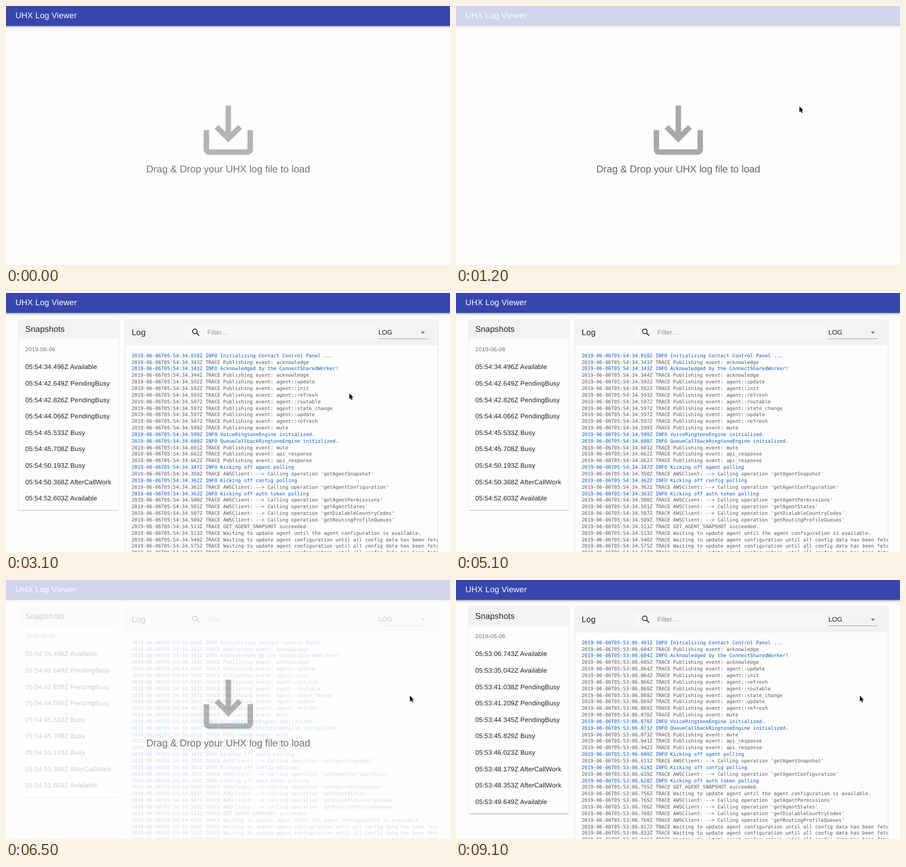
An HTML page with a canvas that plays this animation: 800x467 px, repeating every 10000 ms.

```html
<!DOCTYPE html>
<html lang="en">
<head>
<meta charset="utf-8">
<title>Log Viewer</title>
<style>
  html, body { margin: 0; width: 100%; height: 100%; overflow: hidden; background: #fefdfe; }
  canvas { display: block; width: 800px; height: 467px; }
</style>
</head>
<body>
<canvas id="stage" width="800" height="467"></canvas>
<script>
const W = 800, H = 467, LOOP = 10000, STEP = 100;
const REM = 16 * 800 / 1080;
const SANS = '"Liberation Sans", Arial, sans-serif';
const MONO = '"DejaVu Sans Mono", monospace';
const PAPER = '#fefdfe', BAR = '#3546ac', CARD_HEAD = '#f3f2f4';
const INK = 'rgba(0,0,0,.87)', SOFT = 'rgba(0,0,0,.54)', FAINT = 'rgba(0,0,0,.42)';

const ctx = document.getElementById('stage').getContext('2d');
ctx.textRendering = 'geometricPrecision';

const event = name => 'TRACE Publishing event: ' + name;
const call = name => `TRACE AWSClient: --> Calling operation '${name}'`;
const info = text => 'INFO ' + text;

const start = [
  info('Initializing Contact Control Panel ...'),
  event('acknowledge'),
  info('Acknowledged by the ConnectSharedWorker!'),
  ...['acknowledge', 'agent::update', 'agent::init', 'agent::refresh', 'agent::routable',
    'agent::state_change', 'agent::update', 'agent::refresh', 'mute'].map(event),
  info('VoiceRingtoneEngine initialized.'),
  info('QueueCallbackRingtoneEngine initialized.'),
  ...['mute', 'api_response', 'api_response'].map(event),
  info('Kicking off agent polling'),
  call('getAgentSnapshot'),
  info('Kicking off config polling'),
  call('getAgentConfiguration'),
  info('Kicking off auth token polling')
];
const calls = ['getAgentPermissions', 'getAgentStates', 'getDialableCountryCodes',
  'getRoutingProfileQueues'].map(call);
const snapshot = [
  'TRACE GET_AGENT_SNAPSHOT succeeded.',
  'TRACE Waiting to update agent until the agent configuration is available.'
];
const waiting = Array(3).fill(
  'TRACE Waiting to update agent configuration until all config data has been fetched.');

function makeLog(prefix, millis, messages, states) {
  return {
    states,
    lines: millis.split(' ').map((ms, i) => ({
      text: `2019-06-06T${prefix}.${ms}Z ${messages[i]}`,
      color: messages[i].startsWith('INFO') ? '#0b5cca' : '#575659'
    }))
  };
}

const firstLog = makeLog('05:54:34',
  '018 343 343 344 592 592 593 597 597 597 597 599 599 600 601 662 662 347 350 362 362 363 ' +
  '500 501 507 509 513 513 540 575 577',
  [...start, ...calls, ...snapshot, ...waiting],
  ['05:54:34.496Z Available', '05:54:42.649Z PendingBusy', '05:54:42.826Z PendingBusy',
    '05:54:44.066Z PendingBusy', '05:54:45.533Z Busy', '05:54:45.708Z Busy',
    '05:54:50.193Z Busy', '05:54:50.368Z AfterCallWork', '05:54:52.603Z Available']);

const secondLog = makeLog('05:53:06',
  '401 604 604 605 864 864 866 869 869 869 869 870 870 871 873 941 942 609 611 619 619 620 ' +
  '755 756 765 766 768 769 817 833 846',
  [...start, ...snapshot, ...calls, ...waiting],
  ['05:53:06.743Z Available', '05:53:35.042Z Available', '05:53:41.038Z PendingBusy',
    '05:53:41.209Z PendingBusy', '05:53:44.345Z PendingBusy', '05:53:45.829Z Busy',
    '05:53:46.023Z Busy', '05:53:48.179Z AfterCallWork', '05:53:48.353Z AfterCallWork',
    '05:53:49.649Z Available']);

function text(str, x, y, size, color, { spacing = 0, align = 'left', family = SANS, weight = 400 } = {}) {
  ctx.font = `${weight} ${size}px ${family}`;
  ctx.letterSpacing = spacing * size + 'px';
  ctx.textAlign = align;
  ctx.fillStyle = color;
  ctx.fillText(str, x, y);
}

function box(x, y, w, h, color, radius = 0) {
  ctx.fillStyle = color;
  ctx.beginPath();
  ctx.roundRect(x, y, w, h, radius);
  ctx.fill();
}

function shadowed(dy, blur, alpha, draw) {
  ctx.save();
  ctx.shadowColor = `rgba(0,0,0,${alpha})`;
  ctx.shadowOffsetY = dy;
  ctx.shadowBlur = blur;
  draw();
  ctx.restore();
}

function polygon(points, color) {
  ctx.beginPath();
  points.forEach(([x, y]) => ctx.lineTo(x, y));
  ctx.closePath();
  ctx.fillStyle = color;
  ctx.fill();
}

function line(x1, y1, x2, y2, color, width) {
  ctx.strokeStyle = color;
  ctx.lineWidth = width;
  ctx.beginPath();
  ctx.moveTo(x1, y1);
  ctx.lineTo(x2, y2);
  ctx.stroke();
}

function drawBar() {
  const bar = () => box(-10, -10, W + 20, 45.6, BAR);
  shadowed(1.5, 3, .3, bar);
  shadowed(2, 5, .2, bar);
  text('UHX Log Viewer', 17, 22.3, 1.25 * REM, '#fff', { spacing: .0075 });
}

function drawCard(x, w, bottom, headHeight, title, titleX, titleY) {
  const top = 47.4;
  const card = () => box(x, top, w, bottom - top, PAPER, 3);
  shadowed(.8, 2.2, .2, card);
  shadowed(.8, .8, .2, card);
  box(x, top, w, headHeight, CARD_HEAD, [3, 3, 0, 0]);
  text(title, titleX, titleY, 1.25 * REM, INK, { spacing: .0075 });
}

function drawSnapshots(states) {
  const pitch = 29.65;
  drawCard(23, 180, 124.6 + pitch * states.length, 35.6, 'Snapshots', 34.8, 70);
  text('2019-06-06', 34.8, 104.6, .875 * REM, SOFT, { spacing: .01071 });
  states.forEach((s, i) => text(s, 34.8, 137.2 + i * pitch, REM, INK, { spacing: .00938 }));
}

function drawSearch() {
  box(322, 58, 344, 26, '#f7f6f8', 3);
  ctx.strokeStyle = INK;
  ctx.lineWidth = 1.5;
  ctx.beginPath();
  ctx.arc(340.2, 69.2, 4.1, 0, 7);
  ctx.stroke();
  line(343.4, 72.4, 348, 77, INK, 1.7);
  text('Filter…', 362.8, 75, REM, FAINT);
}

function drawSelect() {
  text('LOG', 671, 74.6, REM, INK);
  box(671, 82, 89, .8, FAINT);
  polygon([[747.3, 69.8], [754.9, 69.8], [751.1, 73.6]], SOFT);
}

function drawLog({ states, lines }) {
  drawSnapshots(states);
  drawCard(214.8, 563.4, H + 20, 47.4, 'Log', 226.5, 76.2);
  drawSearch();
  drawSelect();
  ctx.save();
  ctx.beginPath();
  ctx.rect(215, 95, 563.2, H);
  ctx.clip();
  lines.forEach((l, i) =>
    text(l.text, 226.3, 115.7 + i * .74074 * REM * 1.35, 8.86, l.color, { family: MONO }));
  ctx.restore();
}

const dropIcon = new Path2D('M19 12v7H5v-7H3v7c0 1.1.9 2 2 2h14c1.1 0 2-.9 2-2v-7h-2z' +
  'm-6 .67l2.59-2.58L17 11.5l-5 5-5-5 1.41-1.41L11 12.67V3h2z');

function drawPrompt() {
  ctx.save();
  ctx.translate(341.3, 164.6);
  ctx.scale(4.938, 4.938);
  ctx.fillStyle = 'rgba(0,0,0,.29)';
  ctx.fill(dropIcon);
  ctx.restore();
  text('Drag & Drop your UHX log file to load', 400.4, 300, 1.5 * REM, SOFT, { align: 'center' });
}

function drawOverlay() {
  box(0, 0, W, H, 'rgba(255,254,255,.78)');
  drawPrompt();
}

function drawCursor(x, y) {
  ctx.save();
  ctx.translate(x, y);
  const arrow = [[0, 0], [0, 10.2], [2.2, 8.2], [3.8, 11.8], [5.5, 11.1], [3.9, 7.6], [6.9, 7.3]];
  shadowed(.8, 1.5, .35, () => polygon(arrow, '#000'));
  ctx.strokeStyle = '#fff';
  ctx.lineWidth = 1.2;
  ctx.stroke();
  polygon(arrow, '#000');
  ctx.restore();
}

function drawFile(x, y) {
  ctx.save();
  ctx.translate(x, y);
  box(-86, -10.5, 9, 12, '#c4c4c8', 1);
  box(-85.2, -9.7, 7.4, 10.4, '#f6f6f8', 1);
  for (let i = 0; i < 4; i++) box(-84, -7 + i * 2, 5, .8, '#bdbdc2');
  box(-75, -9.8, 77, 11.2, '#4a86d6', 5);
  text('agent-log (8).txt', -72.3, -1, 9, '#fff', { weight: 700 });
  drawCursor(0, 0);
  box(-1, 9, 14, 14, '#23930f', 7);
  box(0, 10, 12, 12, '#31a81a', 6);
  box(2.5, 15.1, 7, 1.8, '#fff');
  box(5.1, 12.5, 1.8, 7, '#fff');
  ctx.restore();
}

// Each drag glides to its drop point, then the new log replaces the page.
const drags = [
  { from: 700, drop: 1200, load: 1400, x: 618.8, y: 181, dx: 165, dy: 20, decay: 160 },
  { from: 6000, drop: 6400, load: 6600, x: 727.8, y: 208.6, dx: 52, dy: 5, decay: 75 }
];

function drawPointer(t, { from, drop, x, y, dx, dy, decay }) {
  if (t >= drop) return drawCursor(x, y);
  const rest = Math.exp((from - t) / decay);
  drawFile(x + dx * rest, y + dy * rest);
}

function render(time) {
  const t = Math.floor((time % LOOP) / STEP) * STEP;
  const [first, second] = drags;
  ctx.clearRect(0, 0, W, H);
  box(0, 0, W, H, PAPER);

  if (t < first.load) drawPrompt();
  else drawLog(t < second.load ? firstLog : secondLog);
  drawBar();

  if (drags.some(d => t >= d.from && t < d.load)) drawOverlay();

  if (t >= second.from) drawPointer(t, second);
  else if (t >= first.from && t < 4300) drawPointer(t, first);
  else if (t === 4300) drawCursor(first.x + 9.5, first.y + 1);
}

const origin = performance.now();
function tick() {
  render(performance.now() - origin);
  requestAnimationFrame(tick);
}
tick();
</script>
</body>
</html>
```
